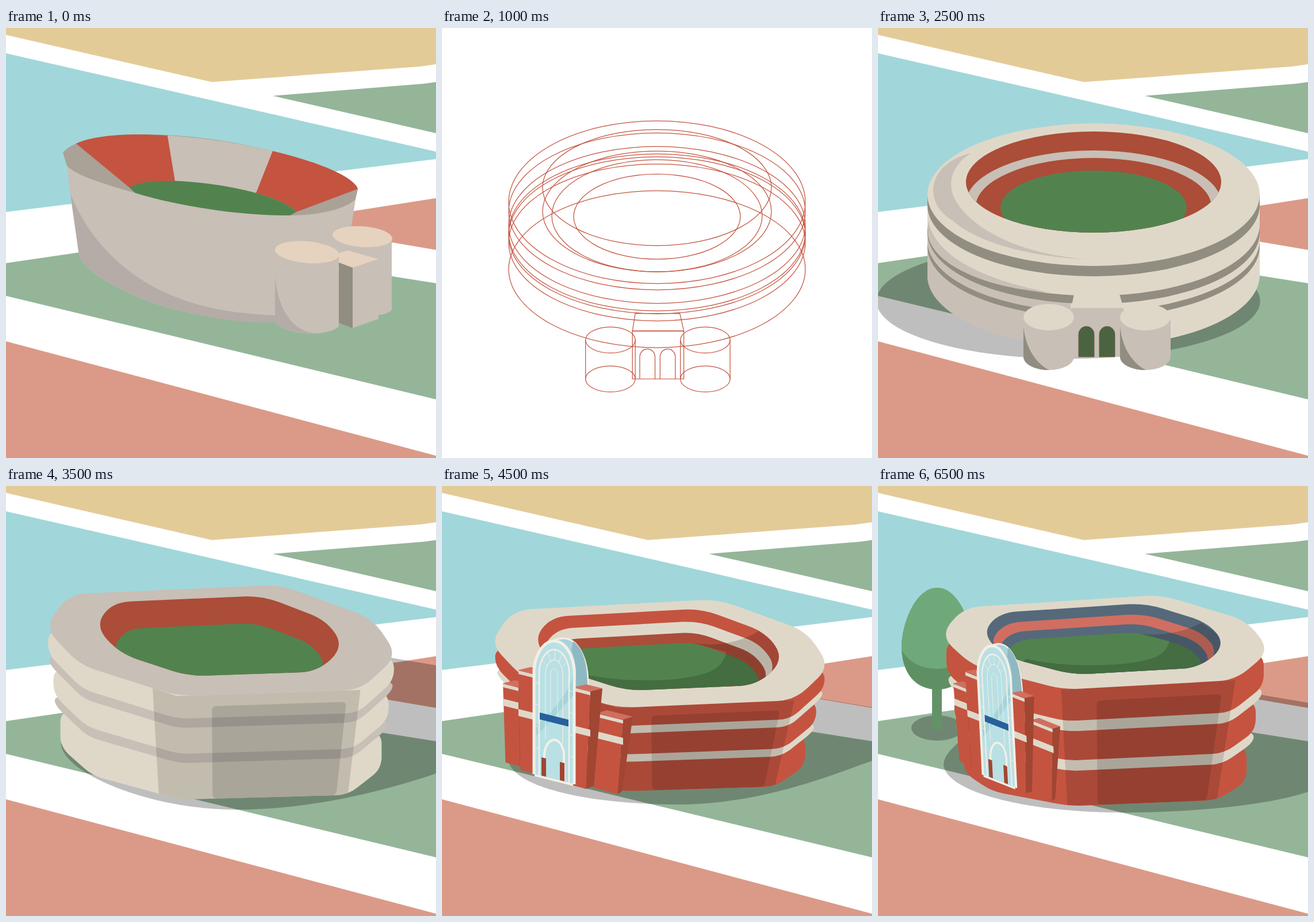
Write an HTML page that moves like this. It is 748x748 px and loops after 7000 ms.

```html
<!DOCTYPE html>
<html lang="en">
<head>
<meta charset="utf-8">
<title>Stadium sketches</title>
<style>
html, body { margin: 0; width: 100%; height: 100%; overflow: hidden; background: #fff; }
svg { display: block; width: 100%; height: 100%; }
.scene { opacity: 0; animation: show 7s step-end infinite; animation-delay: calc(var(--slot) * .5s - 7s); }
.wire * { fill: none; stroke: #c4533f; stroke-width: 1.25; clip-path: none; }
.wire .paper { fill: #fff; stroke: none; }
.wire .solid { display: none; }
@keyframes show { 0% { opacity: 1; } 7.142857%, 100% { opacity: 0; } }
</style>
</head>
<body>
<svg id="stage" viewBox="0 0 748 748">
  <rect width="748" height="748" fill="#fff"/>
  <path fill="#e3cb98" d="M0 0H748V63L720 67 358 94 0 12Z"/>
  <path fill="#a1d7da" d="M0 44 748 215V228L0 320Z"/>
  <path fill="#95b599" d="M464 118 726 97 748 94V183ZM0 409 273 369 748 444V646L0 466Z"/>
  <path fill="#db9a88" d="M748 296V386L472 339ZM0 545 748 744V748H0Z"/>
</svg>
<script>
const C = {
  stone: '#c8bfb6', cream: '#dfd8c9', taupe: '#918d80', dim: '#aaa197', peach: '#e5d2bf',
  red: '#c45440', brick: '#ab4d38', rust: '#a04632', pink: '#d06f61',
  grass: '#52834e', slate: '#55697a', white: '#f3efe7', glass: '#b9e0e4'
};
let clips = 0;

const path = (d, fill, extra = '') => `<path d="${d}" fill="${fill}" ${extra}/>`;
const solid = (d, fill, opacity = 1) => path(d, fill, `class="solid" fill-opacity="${opacity}"`);
const shadow = (d, opacity = .255) => solid(d, '#000', opacity);
const group = (body, transform) => `<g transform="${transform}">${body}</g>`;
const ellipse = (x, y, rx, ry, fill, extra = '') =>
  `<ellipse cx="${x}" cy="${y}" rx="${rx}" ry="${ry}" fill="${fill}" ${extra}/>`;
const rect = (x, y, w, h, fill) =>
  `<rect x="${x}" y="${y}" width="${w}" height="${h}" fill="${fill}" class="solid"/>`;
const mix = (a, b, t) => a.map((v, i) => v + (b[i] - v) * t);

function clipped(shape, body) {
  const id = 'clip' + clips++;
  return `<clipPath id="${id}">${shape}</clipPath><g clip-path="url(#${id})">${body}</g>`;
}

// Closed polygon whose corners are rounded by up to r
function poly(points, r = 0) {
  const toward = (a, b) => {
    const len = Math.hypot(b[0] - a[0], b[1] - a[1]) || 1;
    return mix(a, b, Math.min(r / len, .5));
  };
  const n = points.length;
  return points.map((p, i) =>
    `${i ? 'L' : 'M'}${toward(p, points[(i + n - 1) % n])}Q${p} ${toward(p, points[(i + 1) % n])}`).join('') + 'Z';
}

function tiltedArena() {
  return path('M106 240C108 255 110 275 112 290L127 395C135 425 210 465 280 486 340 503 410 513 470 512L580 480 608 298Z', C.stone) +
    solid('M112 288C138 355 190 415 260 452 330 488 400 497 468 500V512C410 513 340 503 280 486 210 465 135 425 127 395Z', '#b5aca8') +
    path('M99 217C104 211 110 206 122 201 145 190 185 185 232 185 320 185 390 196 464 214 540 232 605 258 612 280L608 298C590 315 545 326 494 326 410 327 300 310 225 287 170 271 125 258 106 240Z', C.dim) +
    path('M122 201C150 188 205 182 281 187L294 266C260 267 230 270 214 277Z', C.red) +
    path('M281 187C345 191 405 200 464 214L435 287C390 275 340 268 294 266Z', C.stone) +
    path('M464 214C540 232 605 258 612 280L505 320C495 308 470 297 435 287Z', C.red) +
    path('M214 277C235 267 260 266 294 266 340 268 390 275 435 287 470 297 495 308 505 320L494 326C410 327 300 310 225 287Z', C.grass) +
    path('M569 357V470L648 499Q668 497 671 489V369Z', C.stone) +
    ellipse(620, 363, 52, 18, C.peach, 'transform="rotate(4 620 363)"') +
    path('M579 391 595 387 648 402 603 417 579 408Z', C.peach) +
    path('M579 408 603 417V522L579 513Z', C.taupe) +
    path('M603 417 648 402V506L603 522Z', C.stone) +
    path('M468 385V515C500 535 560 537 579 519V398Z', C.stone) +
    solid('M468 430C472 490 500 530 540 531 510 531 485 525 468 515Z', '#b5aca8') +
    ellipse(523.5, 390, 56, 19, C.peach, 'transform="rotate(5 523.5 390)"');
}

function turret(x) {
  const rx = 44, ry = 23, top = 503, foot = 572, l = x - rx, r = x + rx;
  return ellipse(x, foot, rx, ry, C.stone) + rect(l, top, rx * 2, foot - top, C.stone) +
    solid(`M${l} ${top + 16}C${l + 4} ${top + 58} ${x - 18} ${top + 83} ${x + 1} ${foot + ry}A${rx} ${ry} 0 0 1 ${l} ${foot}Z`, C.taupe) +
    path(`M${l} ${top}V${foot}M${r} ${top}V${foot}`, 'none') + ellipse(x, top, rx, ry, C.cream);
}

function entrance(lintel) {
  const arch = left => path(`M${left} 572V533A13.5 14 0 0 1 ${left + 27} 533V572Z`, '#4a6442', 'stroke="#765a40"');
  return path(`M341 ${lintel}H420L427 487H336Z`, C.cream) + path('M336 487H427V572H336Z', C.stone) +
    arch(349) + arch(385) + turret(297) + turret(465);
}

// levels: centre heights of the stacked wall ellipses, rim first; inner: opening and its rings as [y, rx, ry]
function roundArena({ x, rx, ry, rimRy = ry, levels, inner, lintel, gate, fit }) {
  const base = levels.at(-1), shades = [C.brick, C.stone, C.brick, C.grass];
  let walls = '';
  for (let i = levels.length - 1; i > 0; i--) {
    const top = levels[i - 1], foot = levels[i], pale = i % 2 === 0, fill = pale ? C.cream : C.taupe;
    walls += ellipse(x, foot, rx, ry, fill) + rect(x - rx, top, rx * 2, foot - top, fill);
    if (pale && i > 2) {
      walls += solid(`M${x - rx} ${top}V${foot}A${rx} ${ry} 0 0 0 ${x - 40} ${foot + ry}V${top + ry - 4}Z`, C.stone);
    }
  }
  const [open, ...rings] = inner.map((r, i) => ellipse(x, ...r, shades[i]));
  return ellipse(x - 44, base + 45, rx * 1.155, ry * .81, '#000', 'class="solid" fill-opacity=".255"') + walls +
    group(solid('M87 335C100 400 190 440 300 460 200 455 95 415 87 360Z', C.stone), fit) +
    ellipse(x, levels[0], rx, rimRy, C.cream) +
    group(solid('M161 218C88 235 75 302 130 335 180 380 290 400 360 402 240 393 160 345 135 300 118 270 130 238 161 218Z', C.stone), fit) +
    open + clipped(open, rings.join('')) + group(entrance(lintel), gate);
}

const OCTAGON = [[.07, .1], [.67, 0], [.93, .295], [1, .62], [.895, .93], [.375, 1], [.1, .73], [0, .4]];
const octagon = ({ x, y, w, h, tilt = 0 }) => OCTAGON.map(([u, v]) => [x + w * u, y + h * v + tilt * (u - .5)]);

// The opening repeats the rim's outline, inset by a share of its size
const inset = ({ x, y, w, h, tilt = 0 }, k) =>
  ({ x: x + w * k, y: y + h * k * .68, w: w * (1 - 2.06 * k), h: h * (1 - 1.92 * k), tilt: tilt * .75 });

function castShadow({ left, leftY, foot, footY, rightY, topY }) {
  return shadow(`M${left} ${leftY}C${left + 5} ${leftY + 50} ${foot - 150} ${footY} ${foot} ${footY}` +
    `C${foot + 150} ${footY} 690 ${rightY + 20} 748 ${rightY}V${topY}L500 ${topY - 42}` +
    `L${left + 110} ${leftY - 90}Q${left} ${leftY - 35} ${left} ${leftY}Z`);
}

function octagonArena({ box, height, storey, taper, lip = .127, corner = .25, walls, rim, seats, steps = 1, cast }) {
  const outline = octagon(box), mid = box.x + box.w / 2, ground = box.y + box.h;
  // Lower levels narrow, and flatten faster than they narrow
  const lower = ([x, y], d) =>
    [mid + (x - mid) * (1 - taper * d), ground + (y - ground) * (1 - 2.6 * taper * d) + d];
  const front = outline.slice(3).reverse();
  const stops = [0, storey, storey + .09, storey + .34, storey + .43, 1].map(v => v * height);

  let tiers = '', hulls = '';
  for (let i = stops.length - 1; i > 0; i--) {
    const d = stops[i], edge = front.map(p => lower(p, d));
    const raise = ([x, y]) => [x, y - d + stops[i - 1]];
    const hull = solid(poly([raise(edge[0]), ...edge, raise(edge.at(-1))], 20), walls[(i + 1) % 2]);
    hulls += hull;
    tiers += hull + path(poly(outline.map(p => lower(p, d)), 26), 'none');
  }

  const [right, near, side] = outline.slice(4, 7), turn = mix(near, side, corner);
  const facade = (u, v) => lower(mix(near, right, u), v * height);
  const shade = [turn, near, right, ...[right, near, turn].map(p => lower(p, height))];
  const panel = [facade(.19, .11), facade(.93, .11), facade(.93, 1), facade(.19, 1)];
  const shading = clipped(hulls, shadow(poly(shade), .13) + shadow(poly(panel, 8), .125));

  const open = inset(box, lip), bowl = path(poly(octagon(open), 32), seats[0]);
  const rings = seats.slice(1).map((fill, i) => {
    const n = (i + 1) * steps, s = 1 - .055 * n, drop = n * (.13 - .007 * n);
    const ring = {
      x: open.x + open.w * (1 - s) / 2, y: open.y + open.h * ((1 - s) / 2 + drop),
      w: open.w * s, h: open.h * s, tilt: (open.tilt || 0) * s
    };
    return path(poly(octagon(ring), 30 * s), fill);
  }).join('');
  const dusk = seats.length < 3 ? '' : group(
    shadow('M.64 .42C.74 .47 .83 .4 .9 .27L1.02 .55V1.1H.1L.18 .78C.32 .9 .56 .9 .67 .8 .74 .75 .76 .64 .77 .53Z', .17),
    `translate(${open.x} ${open.y}) scale(${open.w} ${open.h})`);
  return castShadow(cast) + tiers + shading + path(poly(outline, 30), rim) + bowl + clipped(bowl, rings + dusk);
}

const SLOPE = .25;
// Band along a sloping front
const strip = (x, y, w, h, fill) => path(`M${x} ${y}l${w} ${w * SLOPE}v${h}l${-w} ${-w * SLOPE}Z`, fill);

function pier(x, y, w, h, depth, band) {
  const fall = w * SLOPE, lean = at => h * (170 - at) * .0005, r = x + w;
  return path(poly([[x, y], [r, y + fall], [r + lean(r), y + h + fall], [x + lean(x), y + h]]), C.red) +
    path(poly([[r, y + fall], [r + depth, y + fall - 5], [r + depth + lean(r) * 2, y + h + fall - 5], [r + lean(r), y + h + fall]]), C.rust) +
    path(poly([[x, y], [x + depth, y - 5], [r + depth, y + fall - 5], [r, y + fall]]), C.pink) +
    strip(x, y + 1, w, 6, C.cream) + strip(x, y + band, w, 12, C.cream);
}

function glassGate() {
  const middle = 195;
  const stroke = (d, width, fill = 'none') => path(d, fill, `stroke="${C.white}" stroke-width="${width}"`);
  const arch = (half, spring, foot, rise = 1.65) => {
    const fall = half * SLOPE, l = middle - half, r = middle + half;
    return `M${l} ${foot - fall}V${spring - fall}A${half} ${half * rise} 0 0 1 ${r} ${spring + fall}V${foot + fall}`;
  };
  const post = x => path(`M${x} ${472 + (x - 173) * SLOPE}l8 2v32l-8 -2Z`, C.rust);

  let bars = '';
  for (let y = 350; y < 500; y += 38) {
    bars += `M160 ${y - 9}l10 2.5M220 ${y + 6}l10 2.5`;
  }
  for (let a = .5; a < 3; a += .5) {
    const c = Math.cos(a), s = Math.sin(a);
    bars += `M${middle + 15 * c} ${328 - 25 * s}L${middle + 26 * c} ${328 - 43 * s}`;
  }
  return pier(106, 343, 27, 138, 21, 27) + pier(133, 320, 29, 174, 21, 68) + pier(270, 395, 45, 130, 17, 32) +
    stroke('M178 300C180 274 195 265 211 265 237 265 254 300 254 346L232 352Z', 3, '#a7d3d9') +
    solid('M228 270C246 283 253 310 253 346L233 351C234 320 232 300 225 286Z', '#8fb9c2') +
    pier(230, 350, 28, 170, 21, 67) +
    stroke(arch(35, 328, 510), 5, C.glass) +
    solid('M164 435 228 365V330C226 345 200 390 164 415Z', '#94cdd4', .55) +
    [[26, 510, 2.5], [15, 444, 1.2], [6, 402, .9]].map(([half, foot, width]) => stroke(arch(half, 328, foot), width)).join('') +
    stroke(bars, .9) + strip(170, 394, 50, 12, '#27609c') +
    stroke(arch(17, 470, 509), 4, C.glass) + post(173) + post(205) +
    strip(161, 501, 67, 4, C.white);
}

function tree() {
  const crown = 'M41 280C41 240 65 177 103 177 140 177 165 240 165 285';
  return ellipse(103, 421, 45, 22, '#000', 'class="solid" fill-opacity=".255"') +
    path('M94 345H111V423Q102 427 94 423Z', '#649268') +
    path(crown + 'C165 325 140 354 103 354 65 354 41 325 41 280Z', '#5f9063') +
    path(crown + 'C135 330 65 328 41 285Z', '#70a979');
}

const tallRound = () => roundArena({
  x: 374, rx: 258, ry: 136.5, rimRy: 141.5, levels: [303, 319, 342.5, 355.5, 360.5, 373, 419.5],
  inner: [[277.5, 199, 101], [319, 199, 105], [326.5, 183, 97.5], [328, 145, 74]],
  lintel: 456, gate: 'matrix(.982 0 0 .982 1.3 48.8)', fit: 'matrix(.895 0 0 1.141 38.4 -28.4)'
});
const wideRound = () => roundArena({
  x: 375, rx: 289, ry: 124, levels: [290, 308, 342, 356, 369, 380, 430],
  inner: [[268, 222, 88], [305, 222, 92], [311, 205, 85], [312, 162, 64]],
  lintel: 463, gate: '', fit: ''
});
const stoneOctagon = () => octagonArena({
  box: { x: 67, y: 171, w: 614, h: 195, tilt: 6 },
  height: 180, storey: .22, taper: .0005, lip: .143,
  walls: [C.cream, C.stone], rim: C.stone, seats: [C.brick, C.grass], steps: 2.4,
  cast: { left: 96, leftY: 450, foot: 400, footY: 563, rightY: 500, topY: 312 }
});
const brickOctagon = options => octagonArena({
  walls: [C.red, C.cream], rim: C.cream, seats: [C.red, C.cream, C.brick, C.grass], ...options
});
const lowBrick = () => brickOctagon({
  box: { x: 83, y: 197, w: 592, h: 189 },
  height: 145, storey: .22, taper: .001,
  cast: { left: 115, leftY: 475, foot: 410, footY: 554, rightY: 478, topY: 385 }
}) + glassGate();
const narrowBrick = () => brickOctagon({
  box: { x: 109, y: 189, w: 549, h: 153 },
  height: 199, storey: .27, taper: .0009,
  cast: { left: 122, leftY: 470, foot: 500, footY: 563, rightY: 540, topY: 387 }
}) + group(glassGate(), 'matrix(.828 .057 .028 .906 31.6 39.1)');
const finalBrick = () => tree() + brickOctagon({
  box: { x: 108, y: 191, w: 574, h: 162, tilt: -10 },
  height: 203, storey: .27, taper: .0007, corner: .03, seats: [C.slate, C.pink, C.slate, C.grass],
  cast: { left: 114, leftY: 485, foot: 420, footY: 568, rightY: 532, topY: 377 }
}) + group(glassGate(), 'matrix(.81 .08 .05 .98 28 -1.7)');

const scene = (slot, body, kind = '') => `<g class="scene ${kind}" style="--slot:${slot}">${body}</g>`;
const colour = (slot, draw) => scene(slot, draw());
const wire = (slot, draw) => scene(slot, '<rect class="paper" width="748" height="748"/>' + draw(), 'wire');

document.getElementById('stage').insertAdjacentHTML('beforeend', [
  colour(0, tiltedArena),
  wire(1, () => group(tiltedArena(), 'translate(14 14) scale(.963)')),
  ...[tallRound, wideRound, stoneOctagon, lowBrick, narrowBrick, finalBrick]
    .flatMap((draw, i) => [wire(i * 2 + 2, draw), colour(i * 2 + 3, draw)])
].join(''));
</script>
</body>
</html>
```
